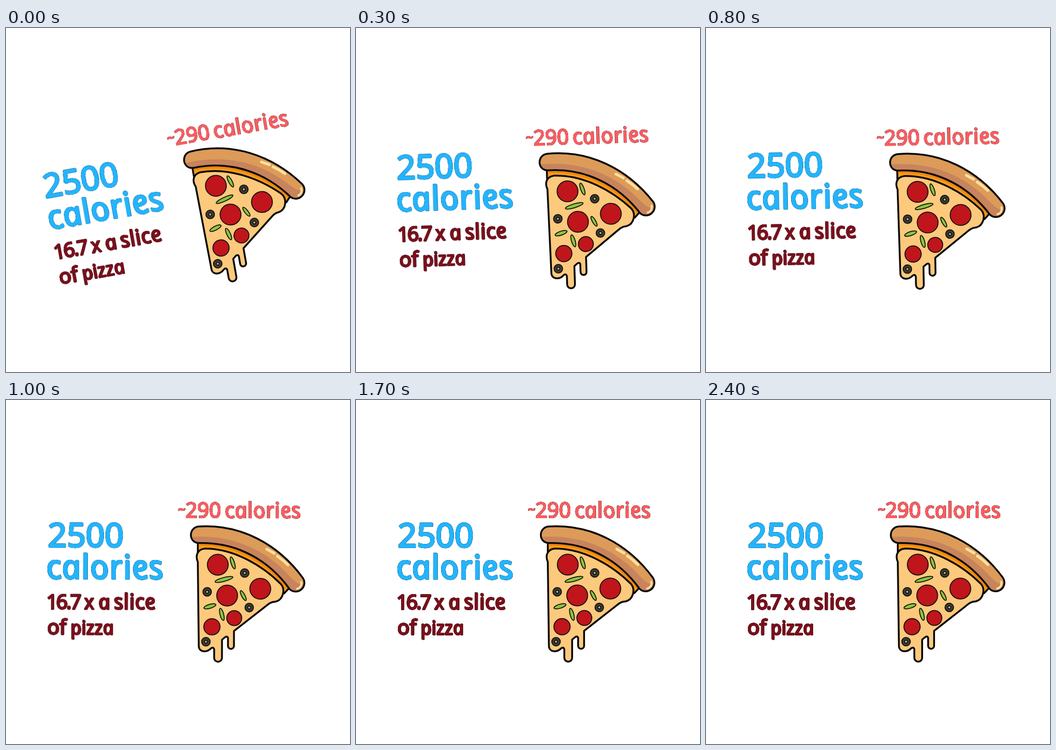
An HTML page that plays this animation: 748x748 px, repeating every 2.5 s.

```html
<!DOCTYPE html>
<html lang="en">
<head>
<meta charset="utf-8">
<title>Calories in pizza slices</title>
<style>
  html, body { margin: 0; width: 100%; height: 100%; overflow: hidden; background: #fff; }
  svg { display: block; width: 100%; height: 100%; }
  text {
    font-family: "Open Sans", "Noto Sans", sans-serif;
    fill: currentColor; stroke: currentColor; stroke-linejoin: round;
  }
  .label { filter: drop-shadow(0 0 .5px #000) drop-shadow(0 0 .3px #000); }
  .hand { font-style: italic; }
  .blue { color: #22b5ff; font-size: 72px; stroke-width: 3.6px; }
  .wine { color: #7a101c; font-size: 44px; stroke-width: 3px; }
  .pink { color: #ff5c60; font-size: 45px; stroke-width: 2.2px; }
  .ink { stroke: #0b0b0b; stroke-width: 4; stroke-linejoin: round; }
  .shine { fill: none; stroke: #ffdf9f; stroke-linecap: round; }
</style>
</head>
<body>
<svg viewBox="0 0 748 748">
  <defs>
    <path id="crust" d="M419 275C510 269 592 313 646 387A19 19 0 0 1 617 411C572 349 505 309 420 311C396 311 396 277 419 275Z"/>
    <clipPath id="crustClip"><use href="#crust"/></clipPath>
  </defs>
  <g id="scene">
    <!-- The skew straightens the italic, which has the single-storey a. -->
    <g class="label blue">
      <text x="91" y="320">2500</text>
      <text class="hand" transform="translate(92 389) skewX(12)" letter-spacing="1.3">calories</text>
    </g>
    <g class="label wine">
      <text x="88" y="455" font-size="43" letter-spacing="-3">16.7</text>
      <text class="hand" transform="translate(173 455) skewX(12)">x</text>
      <text class="hand" transform="translate(204 455) skewX(12)">a</text>
      <text class="hand" transform="translate(238 455) skewX(12)" font-size="46" letter-spacing=".8">slice</text>
      <text x="90" y="510">of</text>
      <text class="hand" transform="translate(143 510) skewX(12)" font-size="41">pizza</text>
    </g>
    <g class="label pink">
      <text x="374" y="248" font-size="28">~</text>
      <text x="390" y="256">290</text>
      <text class="hand" transform="translate(478 256) skewX(12)" font-size="47" letter-spacing=".8">calories</text>
    </g>

    <path class="ink" fill="#ff9a1a" d="M417 308V336L605 420L618 406C570 350 505 310 417 308Z"/>
    <path fill="none" stroke="#e8830f" stroke-width="3" d="M420 315C503 314 566 352 611 409"/>
    <path class="ink" fill="#fdc97c" d="M417 352C411 338 416 325 432 323C498 323 560 362 598 400C608 412 603 434 586 438C576 438 570 444 565 448L496 502V534.5A6.5 6.5 0 0 1 483 534.5V517Q481 512 476 516L470 521V560.5A8.5 8.5 0 0 1 453 560.5V542Q451 536 446 540C436 550 420 548 419.5 535Z"/>

    <use href="#crust" fill="#dd9b59"/>
    <path clip-path="url(#crustClip)" fill="#c8845c" d="M396 298C500 290 572 331 621 387Q636 402 645 400V430H396Z"/>
    <path class="shine" stroke-width="6" d="M567 324L583 333M590 339Q602 347 613 358"/>
    <path class="shine" stroke-width="4" d="M642 395Q644 407 633 410"/>
    <use href="#crust" class="ink" fill="none"/>
    <g id="toppings" stroke="#111" stroke-width="2"></g>
  </g>
</svg>
<script>
const CENTER = 374, LOOP = 2500, STEP = 100;
const scene = document.getElementById("scene");
const toppings = document.getElementById("toppings");

function add(name, attrs) {
  const node = document.createElementNS("http://www.w3.org/2000/svg", name);
  for (const key in attrs) node.setAttribute(key, attrs[key]);
  toppings.append(node);
}

const circle = (cx, cy, r, fill) => add("circle", { cx, cy, r, fill });

function olive(x, y) {
  circle(x, y, 9.3, "#3d3c32");
  circle(x, y, 3.2, "#c9ad72");
}

function pepper(x, y, rx, ry, turn) {
  add("ellipse", { rx, ry, fill: "#8cc63f", transform: `translate(${x} ${y}) rotate(${turn})` });
}

[[460.5, 358, 22.7], [553, 410, 22.7], [481, 425, 22.7], [496.5, 474, 16.3], [448, 493, 17.7]]
  .forEach(([x, y, r]) => circle(x, y, r, "#c0151b"));
[[519, 376], [437.5, 417], [529, 451], [435, 525.5]].forEach(p => olive(...p));
[[493, 354, 3.8, 13.5, -18], [474, 390, 20, 4.2, -15], [516, 425, 3.6, 12, -28],
 [443.5, 448.5, 13.5, 4.3, -17], [469.5, 466, 4, 13.5, -15]].forEach(p => pepper(...p));

// Damped swing, in degrees; it starts tilted to the left and settles level.
function tilt(seconds) {
  const phase = (760 * seconds - 124) * Math.PI / 180;
  return 17.9 * Math.exp(-2.74 * seconds) * Math.cos(phase);
}

function draw(ms) {
  const time = Math.floor((ms % LOOP) / STEP) * STEP;
  scene.setAttribute("transform", `rotate(${tilt(time / 1000).toFixed(3)} ${CENTER} ${CENTER})`);
}

const start = performance.now();
function tick() {
  draw(performance.now() - start);
  requestAnimationFrame(tick);
}
tick();
</script>
</body>
</html>
```
